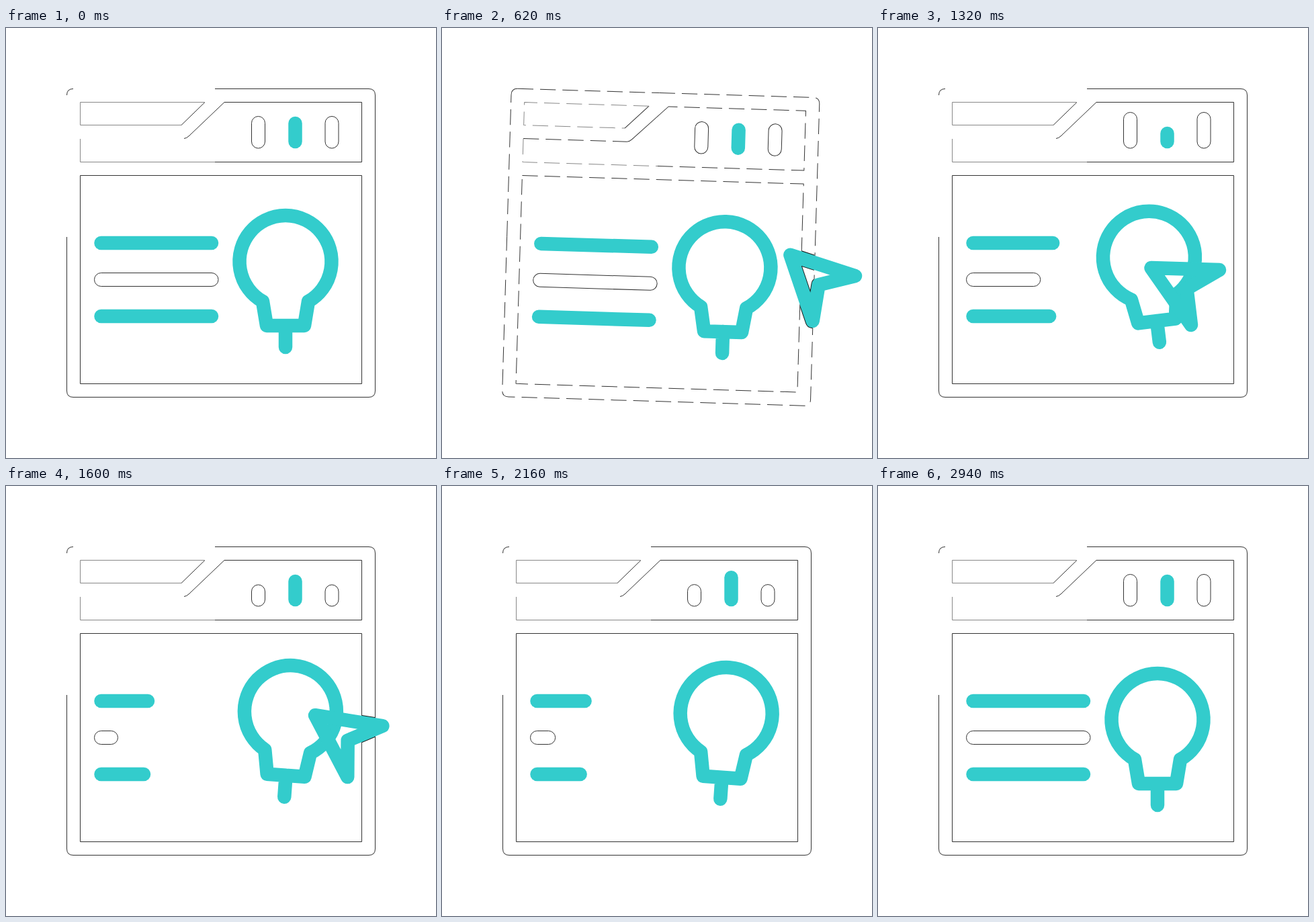
Write an HTML page that moves like this. It is 640 px wide and 640 px high and loops after 3.02 s.

```html
<!DOCTYPE html>
<html lang="en">
<head>
<meta charset="utf-8">
<title>Idea window</title>
<style>
html, body { margin: 0; width: 100%; height: 100%; overflow: hidden; background: #fff; }
svg { display: block; width: 100vw; height: 100vh; }
path, rect { fill: none; stroke-linecap: round; stroke-linejoin: round; }
.teal path { stroke: #3cc; stroke-width: 20.5; }
.thin path, .thin rect { stroke: #333; stroke-width: 1; stroke-linecap: butt; }
.thin .faint { stroke: #888; }
</style>
</head>
<body>
<svg viewBox="0 0 640 640">
  <defs>
    <path id="arrow" d="M0 0L101.5 3 53 31 59.5 85Z"/>
    <clipPath id="side"><rect x="530" y="91" width="19" height="458"/></clipPath>
  </defs>
  <g id="win">
    <g class="thin">
      <path d="M296 110.5L261 144.5M325 110.5L272 161Q269 164 265 164.5"/>
      <path class="edge" d="M311 90.5H540Q549.5 90.5 549.5 100V540Q549.5 549.5 540 549.5H100Q90.5 549.5 90.5 540V311M90.5 100Q90.5 90.5 100 90.5"/>
      <path class="edge" d="M311 199.5H529.5V110.5H325M110.5 219.5H529.5V529.5H110.5Z"/>
      <path class="edge faint" d="M296 110.5H110.5V144.5H261M110.5 165V199.5H311"/>
      <path class="edge" id="extra" d="M90.5 311V100M100 90.5H311M110.5 164.5H265"/>
      <rect class="pill" x="365.5" width="20" rx="10"/>
      <rect class="pill" x="475" width="20" rx="10"/>
      <rect id="bar" x="131.5" y="364.5" height="20" rx="10"/>
    </g>
    <g class="teal">
      <path id="mid"/>
      <path id="top"/>
      <path id="low"/>
      <path id="bulb" d="M382 407A68.5 68.5 0 1 1 450 407L444 443H388ZM416 443V475"/>
    </g>
    <g clip-path="url(#side)"><use class="arrow" href="#arrow" stroke="#1a1a1a" stroke-width="22.5"/></g>
    <use class="arrow" href="#arrow" stroke="#3cc" stroke-width="20.5"/>
  </g>
</svg>
<script>
const LOOP = 3020, BEGIN = 1060, BEAT = 270;
const $ = id => document.getElementById(id);
const all = (sel, fn) => document.querySelectorAll(sel).forEach(fn);
const set = (el, attrs) => { for (const k in attrs) el.setAttribute(k, attrs[k]); };
const clamp = u => Math.min(1, Math.max(0, u));

function ease(t, from, to) {
  const u = clamp((t - from) / (to - from));
  return u * u * (3 - 2 * u);
}

// Eases through evenly spaced poses.
function poses(t, start, step, list) {
  return list.reduce((v, next, i) => v + (next - list[i - 1]) * ease(t, start + (i - 1) * step, start + i * step));
}

// Leaves the rest value, passes the given poses and returns.
const dance = (t, rest, ...list) => poses(t, BEGIN, BEAT, [rest, ...list, rest]);

function draw(t) {
  const tilt = poses(t, 100, 200, [0, -4, 5, 0]);
  const tilted = Math.abs(tilt) > 0.01;
  set($('win'), { transform: `rotate(${tilt} 115 515)` });

  // Hairlines break up into pixel steps while the window is tilted.
  const step = tilted ? 1 / Math.sin(Math.abs(tilt) * Math.PI / 180) : 0;
  const dash = tilted ? `${step * 0.7} ${step * 0.3}` : 'none';
  all('.edge', el => set(el, { 'stroke-dasharray': dash }));
  set($('extra'), { visibility: tilted ? 'visible' : 'hidden' });

  const y = dance(t, 131.5, 125.5, 147, 125.5, 147, 125.5);
  all('.pill', el => set(el, { y, height: 179 - y }));
  set($('mid'), { d: `M430.5 169V${dance(t, 142, 157, 142, 157, 136, 153)}` });

  set($('top'), { d: `M141.5 320H${dance(t, 306, 260, 211, 290, 211, 304)}` });
  set($('low'), { d: `M141.5 429H${dance(t, 306, 255, 205, 240, 205, 241)}` });
  set($('bar'), { width: dance(t, 184.5, 110, 35, 184.5, 35, 161) });

  const lift = -13.3 * Math.sin(Math.PI * clamp((t - BEGIN) / 1460));
  const swing = dance(t, 0, -7, 4.1, -7.2, 4.1, -3.8);
  set($('bulb'), { transform: `translate(0 ${lift}) rotate(${swing} 416 451)` });

  const away = 1.45 * (1 - ease(t, 100, 940) + ease(t, 1410, 2157));
  all('.arrow', el => set(el, {
    transform: `translate(${406.5 + 227 * away} ${357 - 67 * away}) rotate(${31 * away})`
  }));
}

const start = performance.now();
function frame() {
  draw((performance.now() - start) % LOOP);
  requestAnimationFrame(frame);
}
draw(0);
requestAnimationFrame(frame);
</script>
</body>
</html>
```
